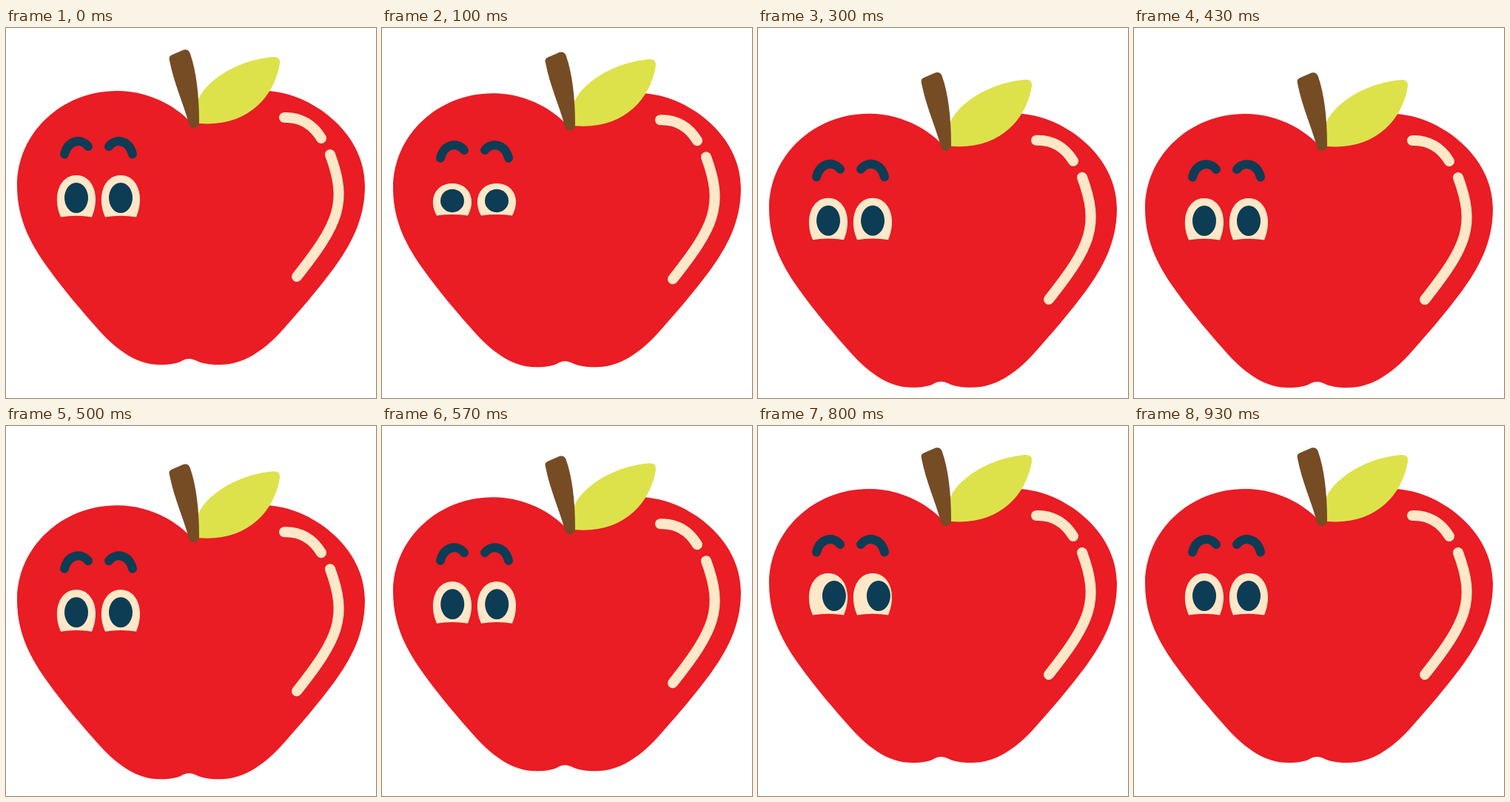
An HTML page that plays this animation: 500x500 px, repeating every 1 s.

```html
<!DOCTYPE html>
<html lang="en">
<head>
<meta charset="utf-8">
<title>Apple</title>
<style>
  html, body { margin: 0; height: 100%; overflow: hidden; background: #fff; }
  svg { display: block; width: 100%; height: 100%; }
</style>
</head>
<body>
<svg viewBox="0 0 500 500">
  <defs>
    <path id="white" fill="#ffe8c8" d="M74 255.500C62 228 72 199 95 199C118 199 128 228 116 255.500Q95 252 74 255.500Z"/>
    <ellipse id="pupil" cx="95" cy="229.500" rx="16" ry="20.500" fill="#0d3c55"/>
    <path id="brow" d="M79 170.500C84 151 102 148.500 111 160"/>
  </defs>
  <g id="apple">
    <path fill="#ea1c24" d="M250 128C236 112 200 85 150 85C75 85 15 142 15 213C15 260 35 294 56.500 324C78 354 103 383 127 410C152 437 178 455 208 455C222 455 233 453 239 449Q247 445 256 449C264 453 274 455 289 455C320 455 347 437 372 410C397 382 422 353 443.500 324C465 294 485 260 485 213C485 140 411 87 352 85C300 85 262 112 250 128Z"/>
    <path fill="#dde24b" d="M256 129L260 96C275 65 320 42 362 39Q371 39 370 48C362 95 325 134 261 129Z"/>
    <path fill="#754c24" d="M221 44Q219 38 225 36L240 29.500Q247 28 249 35C257 58 261 90 261 128Q260 135 254 135Q248 135 247 129C239 100 227 75 221 44Z"/>
    <g fill="none" stroke="#ffe8c8" stroke-width="14" stroke-linecap="round">
      <path d="M376 121C398 120 415 131 426 149"/>
      <path d="M438 171C462 236 450 264 393 336"/>
    </g>
    <g id="brows" fill="none" stroke="#0d3c55" stroke-width="12" stroke-linecap="round">
      <use href="#brow"/>
      <use href="#brow" transform="matrix(-1 0 0 1 250 0)"/>
    </g>
    <g id="eyes">
      <use href="#white"/>
      <use href="#white" x="60"/>
      <g id="pupils">
        <use href="#pupil"/>
        <use href="#pupil" x="60"/>
      </g>
    </g>
  </g>
</svg>
<script>
  const LOOP = 1000;
  const steps = [0, 100, 170, 230, 300, 370, 430, 500, 570, 630, 700, 770, 830, 930];
  const move = (id, value) => document.getElementById(id).setAttribute("transform", value);

  // Progress through a time window, held at its ends
  const span = (t, from, to) => Math.min(1, Math.max(0, (t - from) / (to - from)));
  // Smooth rise from 0 to 1 and back
  const bump = p => (1 - Math.cos(2 * Math.PI * p)) / 2;

  function draw(now) {
    const time = now % LOOP;
    const t = steps.filter(s => s <= time).pop();
    const drop = 34 * bump(span(t, 33, 700));
    const blink = bump(span(t, 67, 267));
    const glance = 8 * Math.sin(Math.PI * span(t, 567, 930));

    move("apple", `translate(0 ${drop})`);
    move("brows", `translate(0 ${7.5 * blink})`);
    move("eyes", `translate(0 232.5) scale(1 ${1 - 0.94 * blink}) translate(0 -232.5)`);
    move("pupils", `translate(${glance} 0)`);
  }

  const start = performance.now();
  function tick() {
    draw(performance.now() - start);
    requestAnimationFrame(tick);
  }
  tick();
</script>
</body>
</html>
```
